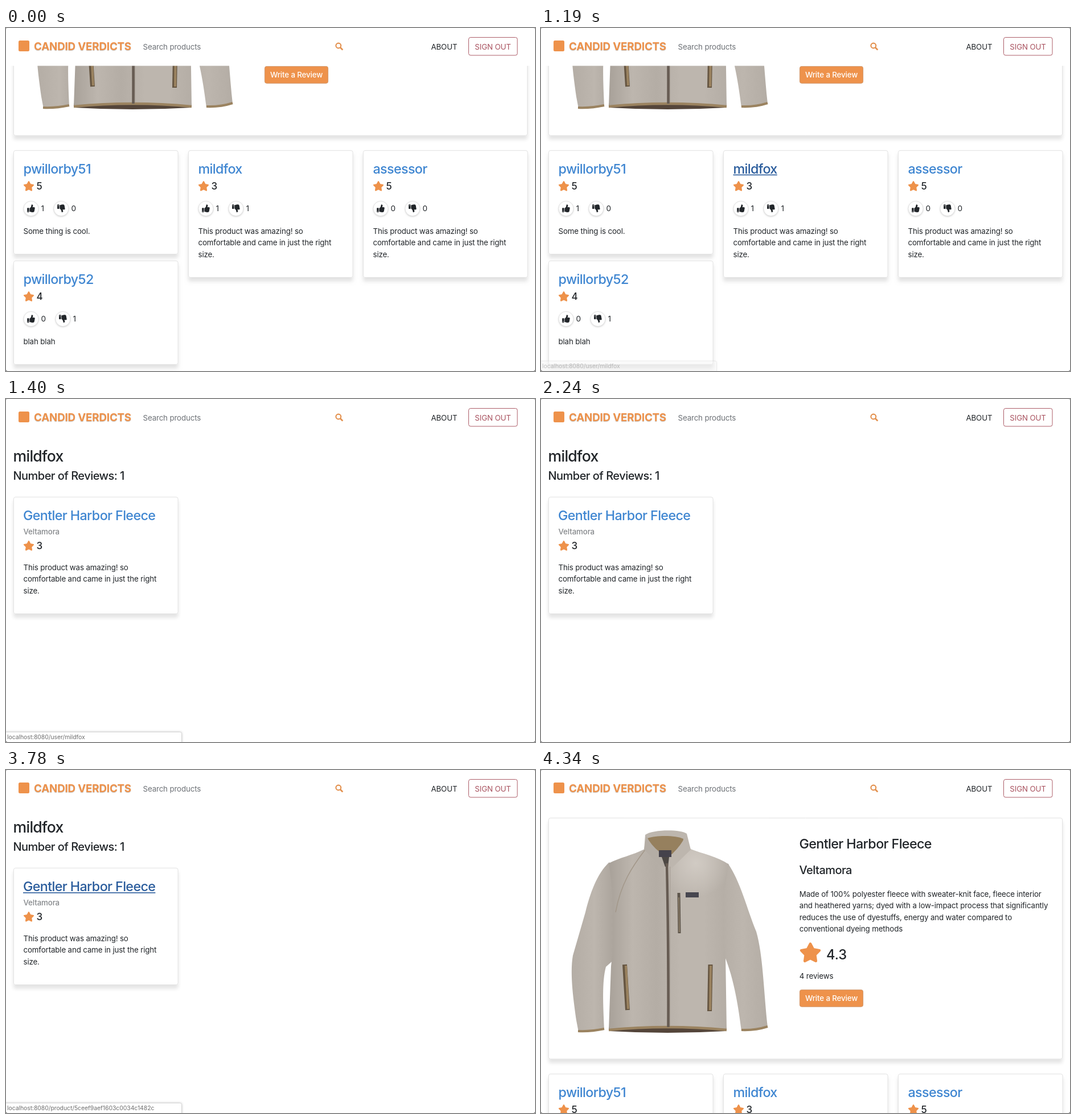
Animation, 929 px wide and 603 px high, one loop 4410 ms. Source, as an HTML page with a canvas:

```html
<!DOCTYPE html>
<html lang="en">
<head>
<meta charset="utf-8">
<title>Candid Verdicts</title>
<style>
  html, body { margin: 0; width: 100%; height: 100%; overflow: hidden; background: #fff; }
  canvas { display: block; width: 929px; height: 603px; }
</style>
</head>
<body>
<canvas id="stage"></canvas>
<script>
const W = 929, H = 603, LOOP = 4410, STEP = 70;
const INK = '#212529', ORANGE = '#ee924b', LINK = '#3f86d1', LINK_HOVER = '#2a5c9c', GRAY = '#6d7176';
const BRAND = 'Veltamora', PRODUCT = 'Gentler Harbor Fleece', USER = 'mildfox';
const PRAISE = ['This product was amazing! so', 'comfortable and came in just the right', 'size.'];
const ABOUT_PRODUCT = [
  'Made of 100% polyester fleece with sweater-knit face, fleece interior',
  'and heathered yarns; dyed with a low-impact process that significantly',
  'reduces the use of dyestuffs, energy and water compared to',
  'conventional dyeing methods'
];
const REVIEWS = [
  { x: 13, y: 534, h: 183, name: 'pwillorby51', stars: 5, up: 1, down: 0, text: ['Some thing is cool.'] },
  { x: 13, y: 728, h: 183, name: 'pwillorby52', stars: 4, up: 0, down: 1, text: ['blah blah'] },
  { x: 320, y: 534, h: 224, name: USER, stars: 3, up: 1, down: 1, text: PRAISE },
  { x: 627, y: 534, h: 224, name: 'assessor', stars: 5, up: 0, down: 0, text: PRAISE }
];

const canvas = document.getElementById('stage');
const ctx = canvas.getContext('2d');
const dpr = window.devicePixelRatio || 1;
canvas.width = W * dpr;
canvas.height = H * dpr;

const ramp = (t, a, b) => Math.min(1, Math.max(0, (t - a) / (b - a)));

function text(str, x, y, size = 13.3, color = INK, weight = 400, track = -0.01) {
  ctx.font = `${weight} ${size}px Inter, "Open Sans", sans-serif`;
  ctx.letterSpacing = (size * track).toFixed(2) + 'px';
  ctx.fillStyle = color;
  ctx.fillText(str, x, y);
  return ctx.measureText(str).width;
}

const heading = (str, x, y, size, color) => text(str, x, y, size, color, 500, -0.027);

function lines(list, x, y) {
  list.forEach((s, i) => text(s, x, y + i * 20.45));
}

function link(str, x, y, hover) {
  const w = heading(str, x, y, 23.3, hover ? LINK_HOVER : LINK);
  if (hover) ctx.fillRect(x, y + 2, w, 1.6);
}

function shadow(color, blur, dy) {
  ctx.shadowColor = color;
  ctx.shadowBlur = blur * dpr;
  ctx.shadowOffsetY = dy * dpr;
}

function roundRect(x, y, w, h, r) {
  ctx.beginPath();
  ctx.roundRect(x, y, w, h, r);
}

function card(x, y, w, h) {
  ctx.save();
  shadow('rgba(0,0,0,.11)', 6, 6.5);
  roundRect(x, y, w, h, 3.4);
  ctx.fillStyle = '#fff';
  ctx.fill();
  ctx.restore();
  roundRect(x + 0.4, y + 0.4, w - 0.8, h - 0.8, 3.4);
  ctx.strokeStyle = '#dedede';
  ctx.lineWidth = 0.9;
  ctx.stroke();
}

function star(cx, cy, r) {
  ctx.beginPath();
  for (let i = 0; i < 10; i++) {
    const a = (i / 5 - 0.5) * Math.PI, d = r * (i % 2 ? 0.46 : 0.88);
    ctx.lineTo(cx + d * Math.cos(a), cy + d * Math.sin(a));
  }
  ctx.closePath();
  ctx.fillStyle = ctx.strokeStyle = ORANGE;
  ctx.lineWidth = r * 0.24;
  ctx.lineJoin = 'round';
  ctx.fill();
  ctx.stroke();
}

const THUMB = new Path2D('M.8 7H3.2Q4 7 4 7.8V15.2Q4 16 3.2 16H.8Q0 16 0 15.2V7.8Q0 7 .8 7Z' +
  'M5 7.6C6.5 6.5 8 4.8 8.4 3C8.7 1.4 8.8 0 9.8 0C11.3 0 12 1.1 12 2.6C12 3.8 11.2 4.6 11 5.5H14.1' +
  'C15.2 5.5 16 6.4 16 7.3Q16 8.2 15.4 8.9Q15.8 10.2 15.1 11.3Q15.3 12.7 14.6 13.7' +
  'C14.7 15.4 13.5 16 10.8 16C8.5 16 6.5 14.9 5 14.6Z');

function thumb(cx, cy, dir) {
  ctx.save();
  shadow('rgba(0,0,0,.2)', 3, 1);
  ctx.beginPath();
  ctx.arc(cx, cy, 13, 0, 7);
  ctx.fillStyle = '#fff';
  ctx.fill();
  ctx.restore();
  ctx.strokeStyle = '#dcdcdc';
  ctx.lineWidth = 0.8;
  ctx.stroke();
  ctx.save();
  ctx.translate(cx, cy - 0.3);
  ctx.scale(0.854, 0.854 * dir);
  ctx.translate(-8, -8);
  ctx.fillStyle = INK;
  ctx.fill(THUMB);
  ctx.beginPath();
  ctx.arc(2, 14, 0.8, 0, 7);
  ctx.fillStyle = '#fff';
  ctx.fill();
  ctx.restore();
}

function review({ x, y, h, name, stars, up, down, text: body }, hover) {
  card(x, y, 289.5, h);
  const left = x + 17.5;
  link(name, left, y + 40.5, hover);
  star(x + 27, y + 63.6, 9.5);
  heading(String(stars), x + 40.5, y + 69, 17);
  thumb(x + 31, y + 102.5, 1);
  const w = text(String(up), x + 48.5, y + 107.2, 13.6);
  const cx = x + 78.5 + w;
  thumb(cx, y + 102.5, -1);
  text(String(down), cx + 17.5, y + 107.2, 13.6);
  lines(body, left, y + 147);
}

function fill(path, style) {
  ctx.fillStyle = style;
  ctx.fill(new Path2D(path));
}

function line(path, color, width) {
  ctx.strokeStyle = color;
  ctx.lineWidth = width;
  ctx.stroke(new Path2D(path));
}

function shade(x0, x1, ...colors) {
  const g = ctx.createLinearGradient(x0, 0, x1, 0);
  colors.forEach((c, i) => g.addColorStop(i / (colors.length - 1), c));
  return g;
}

function glow(x, y, r) {
  const g = ctx.createRadialGradient(x, y, 0, x, y, r);
  g.addColorStop(0, 'rgba(214,208,201,.8)');
  g.addColorStop(1, 'rgba(214,208,201,0)');
  return g;
}

function jacket() {
  const light = '#bdb6ae', mid = '#b4ada5', dark = '#a8a199', trim = '#9b8360', hollow = '#54453a';
  ctx.lineCap = 'butt';
  // sleeves
  fill('M120 162C98 182 86 218 78 250L56 326C50 360 58 410 62 440L66 461L111 457C109 410 107 372 114 346L132 330L136 200Z',
    shade(54, 134, mid, light, dark));
  fill('M328 164C350 195 362 245 378 284C390 325 391 390 398 452L352 459C347 420 340 370 322 326L308 200Z',
    shade(312, 396, mid, light, mid));
  line('M65 459Q88 460 111 455', trim, 4);
  line('M352 457Q376 458 398 451', trim, 4);
  // body, with the back hem showing below the front
  fill('M119 452H326L325 459Q222 465 120 459Z', hollow);
  const body = 'M182 139C160 150 138 154 119 164C128 220 130 290 123 345L119 456Q222 446 326 456L324 325' +
    'C318 270 320 210 330 166C310 152 285 148 260 138Z';
  fill(body, shade(119, 328, dark, light, mid, light, light, mid));
  fill(body, glow(272, 164, 60));
  line('M183 140C160 170 140 200 131 250', '#a29789', 1.5);
  line('M119 457Q222 447 326 457', trim, 4.5);
  // collar
  fill('M181 140L183 114C196 104 246 104 256 112L263 140L224 172Z', light);
  fill('M187 120C204 114 238 115 250 121L249 130L230 148H207L190 136Z', '#96805e');
  fill('M181 140L185 116Q193 132 208 144L220 168L214 171Z', mid);
  fill('M263 140L254 116Q246 132 232 146L224 168L229 173Z', light);
  fill('M207 141H229V153H207Z', '#45424b');
  fill('M212 153H225L223 170H218Z', '#4c4743');
  // zips and pockets
  line('M221 164Q224 300 223.500 452', '#665b52', 4.5);
  line('M226.500 170V450', '#a39b92', 1);
  line('M242 216L243 287', '#5d554b', 5);
  line('M242 224L243 285', '#8b7d68', 2);
  line('M147 342L152 422', '#665642', 8);
  line('M149 344L153 420', trim, 4);
  line('M297.500 342L296 424', '#665642', 8);
  line('M298 344L297 422', trim, 4);
  fill('M254 215H277V224H254Z', '#47464f');
}

function productPage(scroll, hover) {
  ctx.save();
  ctx.translate(0, -scroll);
  card(13, 84, 903, 424.5);
  jacket();
  heading(PRODUCT, 453.5, 138, 23.3, INK);
  heading(BRAND, 453.5, 183, 20, INK);
  lines(ABOUT_PRODUCT, 453.8, 223);
  star(473, 322.3, 19);
  text('4.3', 501, 333, 23.7, INK, 500, 0);
  text('4 reviews', 453.8, 367);
  roundRect(454.4, 386.4, 111.2, 29.8, 3.4);
  ctx.fillStyle = ORANGE;
  ctx.fill();
  ctx.strokeStyle = '#cf9568';
  ctx.lineWidth = 0.9;
  ctx.stroke();
  text('Write a Review', 464, 406, 13.3, '#fff', 500);
  REVIEWS.forEach(r => review(r, hover && r.name === USER));
  ctx.restore();
}

function userPage(hover) {
  heading(USER, 12.5, 109.5, 26.6, INK);
  heading('Number of Reviews: 1', 12.5, 142, 20, INK);
  card(13, 172, 289.5, 206);
  link(PRODUCT, 30, 213, hover);
  text(BRAND, 30.5, 237.7, 13.3, '#85888b', 500);
  star(40, 258.6, 9.5);
  heading('3', 53.5, 264, 17);
  lines(PRAISE, 30.5, 300.7);
}

function navbar() {
  ctx.fillStyle = '#fff';
  ctx.fillRect(0, 0, W, 66.5);
  roundRect(22, 22, 19, 19, 2.5);
  ctx.fillStyle = ORANGE;
  ctx.fill();
  ctx.save();
  shadow('rgba(90,90,90,.35)', 1, 0.8);
  text('CANDID VERDICTS', 49, 39, 18.8, ORANGE, 700);
  ctx.restore();
  text('Search products', 240.5, 37.6, 13.3, GRAY);
  ctx.strokeStyle = '#e3914f';
  ctx.lineWidth = 2.1;
  ctx.beginPath();
  ctx.arc(583.8, 31, 4.4, 0, 7);
  ctx.stroke();
  line('M586.800 34L591.300 38.500', '#e3914f', 2.6);
  text('ABOUT', 746.5, 37.7);
  roundRect(812.5, 16.5, 85.5, 31.5, 3.4);
  ctx.strokeStyle = '#ad5d68';
  ctx.lineWidth = 1;
  ctx.stroke();
  text('SIGN OUT', 823.3, 37.7, 13.3, '#a9525f');
}

function statusBar(url, alpha) {
  if (!alpha) return;
  ctx.save();
  ctx.globalAlpha = alpha;
  ctx.save();
  shadow(`rgba(0,0,0,${0.25 * alpha})`, 4, 0);
  roundRect(-4, 585.5, 312.5, 24, 3);
  ctx.fillStyle = '#fff';
  ctx.fill();
  ctx.restore();
  ctx.strokeStyle = '#cfcfcf';
  ctx.lineWidth = 0.8;
  ctx.stroke();
  text('localhost:8080/' + url, 2, 598, 10.5, '#707070');
  ctx.restore();
}

function corners() {
  const r = 3;
  for (const [x, y, color] of [[0, 0, '#b5b5b5'], [W, 0, '#b5b5b5'], [0, H, '#555'], [W, H, '#555']]) {
    const dx = x ? -r : r, dy = y ? -r : r;
    ctx.beginPath();
    ctx.moveTo(x, y + dy);
    ctx.quadraticCurveTo(x, y, x + dx, y);
    ctx.lineTo(x, y);
    ctx.fillStyle = color;
    ctx.fill();
  }
}

function draw(t) {
  ctx.setTransform(dpr, 0, 0, dpr, 0, 0);
  ctx.fillStyle = '#fff';
  ctx.fillRect(0, 0, W, H);
  if (t < 1400) productPage(319, t >= 980);
  else if (t < 3850) userPage(t >= 3220);
  else productPage(0, false);
  navbar();
  statusBar('user/' + USER, Math.min(ramp(t, 1140, 1260), 1 - ramp(t, 1560, 1750)));
  statusBar('product/5ceef9aef1603c0034c1482c', Math.min(ramp(t, 3380, 3500), 1 - ramp(t, 4010, 4200)));
  corners();
}

const start = performance.now();
function tick() {
  const t = (performance.now() - start) % LOOP;
  draw(Math.floor(t / STEP) * STEP);
  requestAnimationFrame(tick);
}
tick();
</script>
</body>
</html>
```
